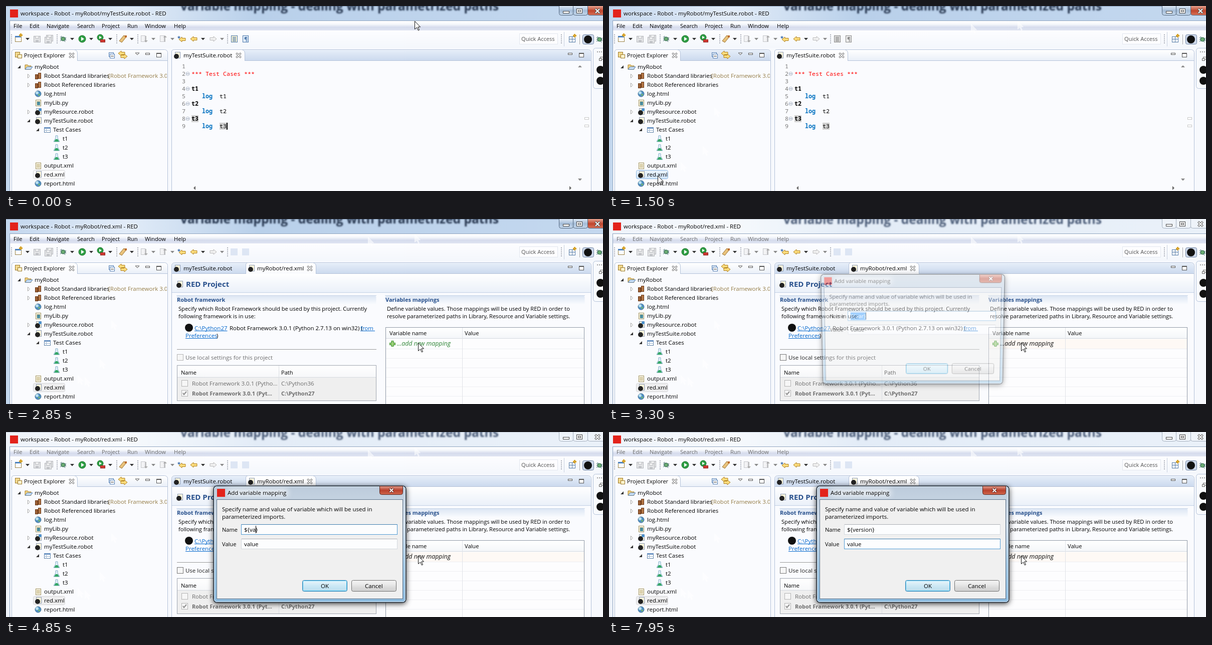
These frames come from a looping animation (1191x371 px, 8000 ms). An HTML page with a canvas:

```html
<!DOCTYPE html>
<html lang="en">
<head>
<meta charset="utf-8">
<title>Add variable mapping</title>
<style>
html, body { margin: 0; width: 100%; height: 100%; overflow: hidden; background: #f7f9fd; }
canvas { position: absolute; left: 0; top: 0; }
#dialog { transform-origin: 606px 225px; }
</style>
</head>
<body>
<canvas id="main" width="1191" height="371"></canvas>
<canvas id="dialog" width="1191" height="371"></canvas>
<script>
const LOOP = 8000;
const mainCtx = main.getContext('2d', { alpha: false });
const dialogCtx = dialog.getContext('2d');
let c = mainCtx;

const SANS = 'px "Open Sans", "Noto Sans", sans-serif';
const UI = '11.1' + SANS, LABEL = '11.5' + SANS, BOLD = 'bold 11' + SANS, ITALIC = 'italic 12.3' + SANS;
const MONO = '11.67px "Noto Sans Mono", monospace';
const NAVY = '#28508c', LINK = '#0066cc', EDGE = '#b4c2d9', PAGE = '#fafbfe';

// [time, x, y] of the pointer tip
const moves = [
  [0, 815, 30], [400, 722, 36], [550, 560, 76], [700, 360, 135], [850, 210, 203],
  [1000, 187, 281], [1150, 143, 313], [1300, 97, 340],
  [2100, 157, 317], [2250, 330, 292], [2400, 500, 272], [2550, 650, 258],
  [2700, 770, 249], [2850, 822, 248]
];
// [time, text in front of the caret]
const typing = [
  [4350, '${var}'], [4500, '${var'], [4850, '${va'], [5050, '${v'], [5250, '${'],
  [5650, '${v'], [5850, '${ve'], [6050, '${ver'], [6300, '${vers'],
  [6400, '${versi'], [6500, '${versio'], [6650, '${version']
];
const fade = [[3200, .15], [3250, .3], [3300, .45], [3400, .85], [3500, 1]];
const latest = (list, t) => list.filter(s => s[0] <= t).pop();

function rect(x, y, w, h, fill) { c.fillStyle = fill; c.fillRect(x, y, w, h); }
function frame(x, y, w, h, color, fill) {
  if (fill) rect(x, y, w, h, fill);
  c.strokeStyle = color; c.lineWidth = 1;
  c.strokeRect(x + .5, y + .5, w - 1, h - 1);
}
function round(x, y, w, h, r, fill, color) {
  c.beginPath(); c.roundRect(x + .5, y + .5, w - 1, h - 1, r);
  c.fillStyle = fill; c.fill();
  if (color) { c.strokeStyle = color; c.lineWidth = 1; c.stroke(); }
}
function disc(x, y, r, fill, color) {
  c.beginPath(); c.arc(x, y, r, 0, 7);
  c.fillStyle = fill; c.fill();
  if (color) { c.strokeStyle = color; c.lineWidth = 1; c.stroke(); }
}
function poly(points, fill, color, width = 1, open) {
  c.beginPath();
  for (let i = 0; i < points.length; i += 2) c.lineTo(points[i], points[i + 1]);
  if (!open) c.closePath();
  if (fill) { c.fillStyle = fill; c.fill(); }
  if (color) { c.strokeStyle = color; c.lineWidth = width; c.stroke(); }
}
const line = (x, y, x2, y2, color, width) => poly([x, y, x2, y2], null, color, width, true);
function text(s, x, y, color = '#000', font = UI) {
  c.font = font; c.fillStyle = color; c.fillText(s, x, y);
}
function link(s, x, y) {
  text(s, x, y, LINK, LABEL);
  rect(x, y + 1, c.measureText(s).width, 1, LINK);
}
function shade(y, y2, ...colors) {
  const g = c.createLinearGradient(0, y, 0, y2);
  colors.forEach((k, i) => g.addColorStop(i / (colors.length - 1), k));
  return g;
}
function at(x, y, paint) { c.save(); c.translate(x, y); paint(); c.restore(); }
function cross(x, y, r, color, width) {
  line(x - r, y - r, x + r, y + r, color, width);
  line(x - r, y + r, x + r, y - r, color, width);
}
function outlinedCross(x, y, r, edge, width) {
  cross(x, y, r + .5, edge, width);
  cross(x, y, r, '#fff', width / 2);
}
const tabClose = (x, y) => outlinedCross(x, y, 4, '#6d6d6d', 3.4);
const down = (x, y = 66, k = '#333') => poly([x - 4, y - 2, x + 4, y - 2, x, y + 2.5], k);
const dots = (x, y = 57, n = 5) => { for (let i = 0; i < n; i++) rect(x, y + i * 4, 2, 2, '#a5a9b3'); };

function pointer(x, y, edge) {
  at(x + .5, y + .5, () => poly([0, 0, 0, 16, 4, 12.5, 7, 18.5, 9, 17.5, 6.3, 11.5, 11, 11.5], '#fff', edge));
}
// faint marks left where the pointer has been
function trail(t, keep) {
  c.globalAlpha = .55;
  moves.slice(0, -1).forEach(([, x, y], i) => {
    if (moves[i + 1][0] <= t && keep(x, y)) pointer(x, y, '#fff');
  });
  c.globalAlpha = 1;
}

// icons, centred on x, y
function sheet(x, y, lines = '#b9a66a') {
  frame(x - 5, y - 6, 11, 13, '#a0915c', '#fffdf0');
  for (let i = -3; i < 5; i += 2) rect(x - 3, y + i, 7, 1, lines);
}
function robotFile(x, y) {
  frame(x - 4, y - 7, 11, 13, '#8d9bb5', '#fbf6dc');
  disc(x - 1, y + 2, 5, '#222');
}
function libraryFile(x, y) {
  sheet(x, y);
  rect(x - 2, y - 2, 6, 7, '#4a8c9c');
}
function resourceFile(x, y) {
  robotFile(x, y);
  disc(x + 4, y - 4, 3, '#4c91cd');
}
function globe(x, y) {
  disc(x, y, 6, '#4f8fc4', '#4a7394');
  disc(x - 2, y - 2, 3, '#b9e0ef');
  disc(x + 2, y + 2, 2, '#72b174');
}
function books(x, y) {
  frame(x - 6, y - 3, 6, 10, '#693818', '#9b5f35');
  frame(x, y - 6, 6, 12, '#693818', '#b37645');
}
function flask(x, y) {
  poly([x - 2, y - 6, x + 2, y - 6, x + 2, y - 1, x + 6, y + 6, x - 6, y + 6, x - 2, y - 1], '#eaf5fc', '#7faac6');
  poly([x - 2, y + 1, x + 2, y + 1, x + 5, y + 6, x - 5, y + 6], '#35a667');
}
function grid(x, y) {
  frame(x - 6, y - 5, 13, 11, '#5b7ea6', '#fff');
  rect(x - 6, y - 5, 13, 3, '#6b93c2');
  rect(x - 2, y - 3, 1, 9, '#9db5cf'); rect(x - 6, y + 1, 13, 1, '#9db5cf');
}
function folder(x, y) {
  poly([x - 7, y + 5, x - 7, y - 4, x - 2, y - 4, x, y - 2, x + 5, y - 2, x + 5, y + 5], '#f3d27c', '#a37b29');
  poly([x - 7, y + 5, x - 3, y, x + 8, y, x + 4, y + 5], '#cfe3f8', '#4d79ad');
}
function bug(x, y) {
  for (const d of [-4, 0, 4]) line(x - 6, y + d, x + 6, y - d * .7, '#315c5c');
  line(x - 4, y - 6, x + 4, y + 6, '#315c5c');
  disc(x, y, 4, '#6bab72', '#2d6350');
}
function arrow(x, y, dir, fill, color) {
  at(x, y, () => {
    c.scale(dir, 1);
    poly([-7, 0, -1, -5, -1, -2.5, 6, -2.5, 6, 2.5, -1, 2.5, -1, 5], fill, color);
  });
}
function disk(x, y) {
  frame(x - 7, y - 6, 14, 13, '#b5b7bb', '#e4e5e7');
  frame(x - 4, y - 6, 8, 5, '#b5b7bb', '#f7f7f7');
  rect(x - 3, y + 2, 6, 4, '#c4c6ca');
}
function minMax(x, x2, y) {
  frame(x - 4, y - 4, 9, 4, '#555', '#fff');
  frame(x2 - 5, y - 4, 10, 9, '#555', '#fff'); rect(x2 - 5, y - 3, 10, 1, '#555');
}
function checkbox(x, y, on, border = '#8e8f8f') {
  frame(x, y, 13, 13, border, '#f6f6f6');
  if (on) poly([x + 3, y + 6, x + 5, y + 9, x + 10, y + 3], null, '#909090', 2, true);
}

function titleBar(s) {
  const g = c.createLinearGradient(0, 0, 1191, 0);
  (s.modal ? ['#eef3fa', '#f7fafd', '#e3ecf7', '#eaf1f9'] : ['#c3d7ee', '#e2ecf8', '#b9d0ea', '#c4d8ef'])
    .forEach((k, i) => g.addColorStop([0, .2, .42, 1][i], k));
  rect(0, 0, 1191, 371, g);
  rect(0, 0, 1191, 1, s.modal ? '#c3ccd8' : '#8499b4');
  c.filter = 'blur(1.6px)';
  text('variable mapping - dealing with parametrized paths', 348, s.modal ? 10 : 9,
    s.modal ? '#4b5c78' : '#26364f', 'bold 24.6' + SANS);
  c.filter = 'none';
  rect(8, 7, 16, 16, '#e3231b');
  c.save();
  c.shadowColor = '#fff'; c.shadowBlur = 7;
  text(`workspace - Robot - myRobot/${s.form ? 'red.xml' : 'myTestSuite.robot'} - RED`, 29, 19, '#000', LABEL);
  c.restore();
  const edge = s.modal ? '#a5b0bf' : '#53677f';
  const glass = s.modal ? '#eef3f9' : shade(0, 19, '#dce8f5', '#a5bdd8', '#c6d9ed');
  round(1103, -6, 29, 25, 4, glass, edge);
  round(1131, -6, 30, 25, 4, glass, edge);
  round(1160, -6, 48, 25, 4, s.modal ? glass : shade(0, 19, '#e5a28f', '#c0452d', '#d9745a'), edge);
  frame(1111, 10, 13, 5, '#444', '#fff');
  frame(1138, 5, 12, 10, '#444', '#fff'); frame(1141, 8, 6, 4, '#444');
  outlinedCross(1180, 10, 4, '#555', 4);
}

function menuAndTools(s, t) {
  rect(7, 29, 1184, 342, '#8fa4bf');
  rect(8, 30, 1183, 341, '#f7f9fd');
  rect(8, 30, 1183, 19, shade(30, 49, '#fff', '#f6f8fc', '#d6dced', '#dfe4f2'));
  rect(8, 49, 1183, 35, shade(49, 84, '#fdfdff', '#f4f7fc'));
  trail(t, (x, y) => y < 50);
  const menu = { File: 15, Edit: 47, Navigate: 81, Search: 142, Project: 191, Run: 242, Window: 277, Help: 335 };
  for (const k in menu) text(k, menu[k], 44, s.modal ? '#6d6d6d' : '#000');

  [10, 101, 220, 262, 441, 1107].forEach(x => dots(x));
  [43, 132, 170, 208, 251, 393].forEach(x => down(x));
  [294, 332, 431].forEach(x => down(x, 66, '#888'));
  frame(18, 60, 13, 12, '#9a8244', '#fff'); rect(18, 60, 13, 3, '#4f84bf');
  rect(26, 57, 7, 3, '#d7a32b'); rect(28, 55, 3, 7, '#d7a32b');
  disk(62, 66); disk(87, 64); disk(84, 68);
  bug(114, 66);
  disc(152, 66, 7, '#2e9e43', '#1d712c'); poly([150, 62, 156, 66, 150, 70], '#fff');
  disc(188, 63, 6, '#2e9e43', '#1d712c'); poly([186, 60, 191, 63, 186, 66], '#fff');
  frame(188, 67, 10, 6, '#8e1e1e', '#d13b32');
  poly([226, 70, 235, 59, 240, 62, 231, 73], '#e9c27b', '#98702e'); rect(237, 59, 4, 4, '#bd6c2d');
  for (const [x, d] of [[275, 1], [313, -1]]) {
    frame(x - 6, 59, 9, 13, '#c5c6ca', '#f2f2f4');
    line(x + 4, 60, x + 4, 72, '#aaa', 1.5);
    poly([x + 1, 66 + 3 * d, x + 8, 66 + 3 * d, x + 4, 66 + 7 * d], '#aaa');
  }
  arrow(352, 67, 1, '#fbdc7c', '#b28220'); text('*', 342, 68, '#2d62a5', BOLD);
  arrow(375, 66, 1, '#fbdc7c', '#b28220');
  arrow(413, 66, -1, '#f1f1f1', '#b8b8b8');
  if (s.form) { rect(448, 59, 14, 14, '#dde6f4'); rect(471, 59, 14, 14, '#dde6f4'); }
  else {
    const k = s.explorer ? '#888' : '#4c78ab';
    frame(449, 59, 13, 14, k, s.explorer ? '#ddd' : '#fdf5d4');
    for (let y = 62; y < 71; y += 2) rect(452, y, 7, 1, k);
    frame(472, 59, 12, 14, k, s.explorer ? '#eee' : '#e4effb');
    text('¶', 475, 70, k, BOLD);
  }
  frame(1024, 55, 77, 22, '#e3e7ef', '#fdfdff');
  text('Quick Access', 1028, 70, '#555');
  rect(1113, 52, 1, 29, '#c9d1df');
  frame(1123, 61, 13, 12, '#557ba6', '#fff'); rect(1129, 61, 1, 12, '#557ba6'); rect(1123, 66, 13, 1, '#557ba6');
  rect(1131, 58, 7, 3, '#d7a32b'); rect(1133, 56, 3, 7, '#d7a32b');
  rect(1144, 57, 1, 20, '#aaa');
  round(1150, 57, 23, 20, 3, '#cfdaeb', '#6f83a3');
  disc(1161, 67, 8, '#111');
  bug(1184, 67);

  round(1171, 84, 40, 82, 5, '#f8fafd', EDGE);
  for (let x = 1179; x < 1191; x += 4) rect(x, 91, 2, 2, '#999');
  frame(1185, 102, 7, 5, '#666', '#fff'); frame(1183, 105, 6, 5, '#666', '#fff');
  disc(1186, 128, 8, '#111'); disc(1186, 150, 8, '#111');
}

function panel(x, w, active) {
  round(x, 87, w, 300, 6, PAGE, EDGE);
  round(x + 1, 88, w - 2, 22, [5, 5, 0, 0], active ? shade(88, 110, '#e6eef9', '#cbd9ee') : shade(88, 110, '#fff', '#e9eff8'));
  rect(x + 1, 109, w - 2, 1, EDGE);
}
function tab(x, x2) {
  c.beginPath();
  c.moveTo(x, 110); c.lineTo(x, 92); c.quadraticCurveTo(x, 87.5, x + 5, 87.5);
  c.lineTo(x2 - 7, 87.5); c.quadraticCurveTo(x2, 88, x2, 95); c.lineTo(x2, 110);
  c.fillStyle = shade(88, 110, '#fff', PAGE); c.fill();
  c.strokeStyle = EDGE; c.lineWidth = 1; c.stroke();
}

function explorer(s, t) {
  panel(11, 312, s.explorer);
  tab(11.5, 142.5);
  frame(18, 92, 10, 11, '#9a7a2f', '#f5d98d'); frame(23, 97, 9, 8, '#9a7a2f', '#fff3cb');
  text('Project Explorer', 36, 103);
  tabClose(131, 99);
  frame(205, 93, 10, 9, '#557fb3', '#eaf2fb'); frame(207, 96, 10, 9, '#557fb3', '#fff'); rect(209, 100, 6, 1, '#333');
  arrow(231, 95, 1, '#fbdc7c', '#b28220'); arrow(235, 101, -1, '#fbdc7c', '#b28220');
  poly([258, 94, 266, 94, 262, 98], '#fff', '#555');
  minMax(282, 305, 98);
  trail(t, (x, y) => x < 310 && y > 50);

  const hot = t >= 1300 && t < 1950;
  round(54, 329, 64, 18, 3, hot ? shade(329, 347, '#eef6fe', '#cfe4fa') : s.form ? '#eeeeef' : '#fcfcfd', hot ? '#8ab7e3' : '#d5d5d7');
  // label, depth, icon, twistie: 1 open, 2 closed
  const rows = [
    ['myRobot', 0, folder, 1], ['Robot Standard libraries', 1, books, 2], ['Robot Referenced libraries', 1, books, 2],
    ['log.html', 1, globe], ['myLib.py', 1, libraryFile], ['myResource.robot', 1, resourceFile, 2],
    ['myTestSuite.robot', 1, robotFile, 1], ['Test Cases', 2, grid, 1],
    ['t1', 3, flask], ['t2', 3, flask], ['t3', 3, flask],
    ['output.xml', 1, sheet], ['red.xml', 1, robotFile], ['report.html', 1, globe]
  ];
  rows.forEach(([label, depth, icon, twist], i) => {
    const x = Math.round(45 + depth * 18.5), y = 122 + i * 18;
    icon(x, y);
    text(label, x + 12, y + 4, '#000', LABEL);
    if (twist == 1) poly([x - 16, y + 3, x - 22, y + 3, x - 16, y - 3], '#333');
    if (twist == 2) poly([x - 20.5, y - 3.5, x - 16.5, y + .5, x - 20.5, y + 4.5], '#fff', '#a5a5a5');
  });
  c.save(); c.beginPath(); c.rect(200, 130, 121, 20); c.clip();
  text('[Robot Framework 3.0', 204, 144, '#957d47', LABEL);
  c.restore();
}

function code(s) {
  const bold = 'bold ' + MONO;
  for (let n = 1; n < 10; n++) text(n, 351, 110 + n * 15, '#787878', MONO);
  for (const n of [2, 4, 6, 8]) {
    disc(362.5, 106 + n * 15, 3.5, '#fff', '#a9b4c8'); rect(360, 105.5 + n * 15, 5, 1, '#7d8ba5');
  }
  rect(370, 219, 14, 14, '#d0d0d0'); rect(426, 234, 14, 14, '#d0d0d0');
  text('*** Test Cases ***', 370, 140, '#f00', MONO);
  for (let i = 1; i < 4; i++) {
    const y = 140 + i * 30;
    text('t' + i, 370, y, '#000', bold);
    text('log', 391, y + 15, '#0070c0', bold);
    text('t' + i, 426, y + 15, '#000', MONO);
  }
  if (!s.explorer) rect(440, 234, 2, 14, '#000');
  frame(1154, 223, 9, 5, '#c8c8c8', '#fff'); frame(1154, 238, 9, 5, '#c8c8c8', '#fff');
  poly([1141, 123, 1149, 123, 1145, 119], '#888'); down(1145, 348, '#888');
  poly([378, 361, 378, 369, 374, 365], '#666'); poly([1124, 361, 1124, 369, 1128, 365], '#666');
}

function section(title, x) {
  round(x - 1, 153, 399, 18, [4, 4, 0, 0], shade(153, 171, '#dbe5f3', '#f9fbfe'));
  rect(x - 1, 153, 399, 1, '#c5d3e7');
  text(title, x, 166, NAVY, BOLD);
}
function form(s) {
  rect(331, 110, 836, 38, shade(110, 148, '#fff', '#eaf0f9'));
  rect(331, 147, 836, 1, '#c2d0e5');
  robotFile(346, 131);
  text('RED Project', 359, 136, NAVY, 'bold 15' + SANS);

  section('Robot framework', 341);
  text('Specify which Robot Framework should be used by this project. Currently', 344, 184);
  text('following framework is in use:', 344, 199);
  disc(365, 218, 8, '#111');
  link('C:\\Python27', 376, 223);
  text('Robot Framework 3.0.1 (Python 2.7.13 on win32) (', 446, 223, '#000', LABEL);
  link('from ', 707, 223);
  link('Preferences', 358, 238);
  text(')', 420, 238);
  rect(341, 261, 398, 1, '#999');
  checkbox(341, 271, false, s.modal ? '#777' : '#b5b5b5');
  text('Use local settings for this project', 358, 282, s.modal ? '#222' : '#6d6d6d', LABEL);
  frame(341, 293, 398, 72, '#a0a6b0', '#efefef');
  rect(342, 294, 396, 24, shade(294, 318, '#fff', '#f6f7f9'));
  rect(342, 317, 396, 1, '#d5d9df'); rect(544, 294, 1, 70, '#dcdfe4');
  text('Name', 349, 312); text('Path', 549, 312);
  checkbox(350, 323, false, '#b5b5b5'); checkbox(350, 343, true, '#b5b5b5');
  text('Robot Framework 3.0.1 (Pytho...', 371, 334, '#6d6d6d', LABEL);
  text('C:\\Python36', 549, 334, '#6d6d6d', LABEL);
  text('Robot Framework 3.0.1 (Pyt...', 371, 354, '#6d6d6d', BOLD);
  text('C:\\Python27', 549, 354, '#6d6d6d', BOLD);

  section('Variables mappings', 757);
  text('Define variable values. Those mappings will be used by RED in order to', 760, 184);
  text('resolve parameterized paths in Library, Resource and Variable settings.', 760, 199);
  frame(757, 217, 397, 160, '#8f98a5', '#fdfdfe');
  rect(758, 218, 395, 22, shade(218, 240, '#fff', '#f4f6f9'));
  rect(758, 239, 395, 1, '#d5d9df');
  if (s.modal) rect(758, 241, 395, 19, '#fef9f5');
  for (let y = 260; y < 371; y += 19) rect(758, y, 395, 1, '#eeeff2');
  rect(910, 218, 1, 153, '#e0e3e8');
  text('Variable name', 765, 233); text('Value', 915, 233);
  rect(765, 248, 12, 5, '#4a9a3c'); rect(768.5, 244, 5, 12, '#4a9a3c');
  rect(766, 249.5, 10, 2, '#a9d982'); rect(770, 245, 2, 10, '#a9d982');
  text('...add new mapping', 780, 254, s.modal ? '#111' : '#2c8433', ITALIC);
}

function editor(s) {
  panel(330, 838, !s.explorer);
  if (s.form) tab(478.5, 618.5); else tab(330.5, 476.5);
  robotFile(341, 99);
  text('myTestSuite.robot', 354, 103, '#000', LABEL);
  if (s.form) {
    robotFile(489, 99);
    text('myRobot/red.xml', 501, 103, '#000', LABEL);
    tabClose(606, 99);
    form(s);
  } else {
    tabClose(464, 99);
    code(s);
  }
  minMax(1125, 1148, 98);
}

function field(y, focused, value, selected, caret) {
  frame(469, y, 312, 21, focused ? '#4f9bd3' : '#d3d8de', '#fcfdfe');
  rect(470, y, 310, 1, focused ? '#3d7bad' : '#abadb3');
  c.font = LABEL;
  if (selected) rect(475, y + 3, c.measureText(value).width, 16, '#3399ff');
  text(value, 475, y + 15, selected ? '#fff' : '#000', LABEL);
  if (caret != null) rect(475 + Math.round(c.measureText(caret).width), y + 3, 1, 15, '#000');
}
function button(label, x, textX, glow) {
  round(x, 297, 90, 23, 3, shade(297, 320, '#f4f4f4', '#ebebeb', '#dadada', '#cfcfcf'), glow ? '#3c7fb1' : '#707070');
  if (glow) {
    c.save(); c.globalAlpha *= glow;
    round(x + 1, 298, 88, 21, 2, shade(297, 320, '#e8f6fd', '#c8e9f8', '#b4dff4'), '#40c8f4');
    c.restore();
  }
  text(label, textX, 313, '#000', LABEL);
}
function drawDialog(t) {
  c = dialogCtx;
  c.clearRect(0, 0, 1191, 371);
  const step = latest(fade, t);
  if (!step) return;
  // opens by swinging its lower edge towards the viewer
  const away = 1 - step[1];
  dialog.style.opacity = step[1];
  dialog.style.transform = away ? `perspective(1000px) translateY(${-5 * away}px) rotateX(${-11 * away}deg) scale(${1 - .1 * away})` : 'none';

  c.save();
  c.shadowColor = 'rgba(0,0,0,.75)'; c.shadowBlur = 11; c.shadowOffsetY = 2;
  round(413, 107, 386, 236, 7, '#1c2733');
  c.restore();
  round(414, 108, 384, 234, 6, shade(108, 342, '#bccbdb', '#d3dfeb', '#a3c8e4', '#8dbce0'), '#1c2733');
  round(415, 109, 382, 232, 5, 'transparent', '#e3f0fa');
  c.save();
  c.filter = 'blur(6px)';
  rect(442, 115, 120, 13, 'rgba(255,255,255,.75)');
  c.restore();
  rect(421, 114, 16, 16, '#e3231b');
  text('Add variable mapping', 442, 126, '#000', LABEL);
  round(745, 108, 47, 18, [0, 0, 4, 4], shade(108, 126, '#e2a090', '#b8402c', '#d26a50'), '#5a2a24');
  outlinedCross(769, 117, 3.5, '#6b2a22', 4);
  frame(420, 135, 372, 200, '#5d7288', '#f0f0f0');
  text('Specify name and value of variable which will be used in', 431, 159, '#000', LABEL);
  text('parameterized imports.', 431, 174, '#000', LABEL);
  text('Name', 431, 200); text('Value', 431, 229);

  const typed = latest(typing, t);
  const before = typed ? typed[1] : '${var}';
  const name = before.endsWith('}') ? before : before + '}';
  const onValue = t >= 7050;
  const nameCaret = !onValue && (typed || t < 3850) ? before : null;
  field(185, !onValue, name, !typed, nameCaret);
  field(214, onValue, 'value', onValue && t < 7500, t >= 7500 && t < 7950 ? 'value' : null);
  button('OK', 591, 628, .85 + .15 * Math.cos(t / 1500 * Math.PI * 2));
  button('Cancel', 689, 716);
}

function draw(t) {
  c = mainCtx;
  const s = { explorer: t >= 1500 && t < 1950, form: t >= 1950, modal: t >= 3050 };
  titleBar(s);
  menuAndTools(s, t);
  explorer(s, t);
  editor(s);
  const [, x, y] = latest(moves, t);
  pointer(x, y, '#111');
  drawDialog(t);
}

let shown = -1;
const start = performance.now();
function tick() {
  const t = Math.floor((performance.now() - start) % LOOP / 50) * 50;
  if (t !== shown) draw(shown = t);
  requestAnimationFrame(tick);
}
tick();
</script>
</body>
</html>
```
